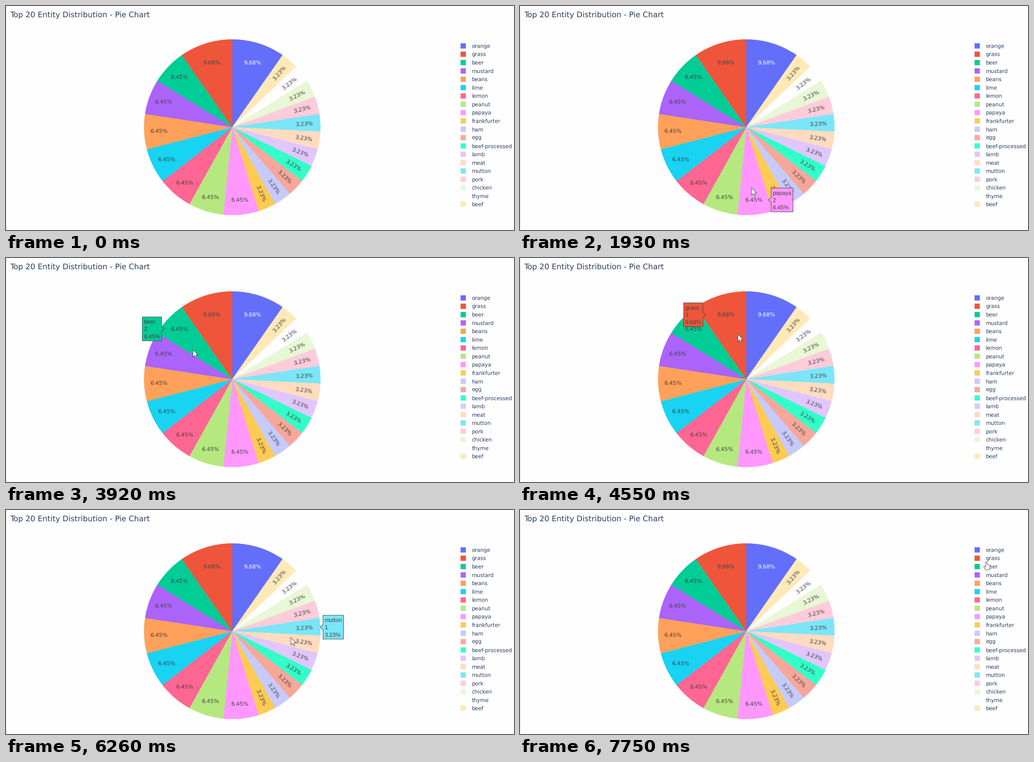
A matplotlib script that plays this animation: 1125x498 px, repeating every 8 s.

```python
import colorsys

import numpy as np
import matplotlib.pyplot as plt
from matplotlib.animation import FuncAnimation
from matplotlib.colors import to_rgb
from matplotlib.patches import Polygon, Rectangle, Wedge

W, H, DPI = 1125, 498, 100
LOOP, STEP = 8000, 25
PT = 72 / DPI
CX, CY, R = 501, 269.5, 195.2
INK, GREY = "#2a3f5f", "#444444"
HOVER_LAG = 70

NAMES = ("orange grass beer mustard beans lime lemon peanut papaya frankfurter "
         "ham egg beef-processed lamb meat mutton pork chicken thyme beef").split()
COUNTS = [3] * 2 + [2] * 7 + [1] * 11
TOTAL = sum(COUNTS)
BASE = ["#636efa", "#ef553b", "#00cc96", "#ab63fa", "#ffa15a",
        "#19d3f3", "#ff6692", "#b6e880", "#ff97ff", "#fecb52"]

# Cursor glides: begin, end, control point, stop
ENTRY = (995, 490)
GLIDES = [
    (150, 340, (882, 428), (769, 366)),
    (570, 1360, (651, 241), (615, 366)),
    (1380, 1440, (603, 379), (592, 392)),
    (1750, 2540, (450, 426), (407, 366)),
    (2560, 3350, (380, 296), (383, 275)),
    (3370, 4170, (385, 225), (430, 189)),
    (4190, 4990, (464, 167), (533, 163)),
    (5090, 5890, (590, 170), (625, 239)),
    (5910, 6500, (632, 235), (631, 327)),
    (6890, 7700, (760, 240), (1033, 115)),
]

ARROW = np.array([(0, 0), (0, 16.5), (3.8, 13), (6.4, 18.5), (8.7, 17.5),
                  (6.4, 12), (11.4, 12)])
HAND = np.array([(-1.5, 0.5), (1.5, 0.5), (1.5, 6), (8, 8), (8, 13), (6.3, 18),
                 (-2, 18), (-6, 11), (-5, 9.5), (-1.5, 12)])


def lighten(color, amount=0.2):
    h, l, s = colorsys.rgb_to_hls(*to_rgb(color))
    return colorsys.hls_to_rgb(h, min(1, l + amount), s)


def contrast(color):
    return "white" if np.dot(to_rgb(color), (0.299, 0.587, 0.114)) < 128 / 255 else GREY


def cursor_at(t):
    pos = np.array(ENTRY, float)
    for begin, end, control, stop in GLIDES:
        if t <= begin:
            break
        u = 1 - (1 - min(1, (t - begin) / (end - begin))) ** 1.5
        pos = ((1 - u) ** 2 * pos + 2 * u * (1 - u) * np.array(control)
               + u * u * np.array(stop))
    return pos


COLORS = BASE + [lighten(c) for c in BASE]

# Clockwise from the top: the first slice, then the rest in reverse
ORDER = [0] + list(range(len(NAMES) - 1, 0, -1))
EDGES = 360 / TOTAL * np.cumsum([0] + [COUNTS[i] for i in ORDER])


def slice_at(x, y):
    dx, dy = x - CX, y - CY
    if np.hypot(dx, dy) > R:
        return None
    angle = np.degrees(np.arctan2(dx, -dy)) % 360
    return NAMES[ORDER[np.searchsorted(EDGES, angle, side="right") - 1]]


plt.rcParams["text.hinting"] = "none"
fig = plt.figure(figsize=(W / DPI, H / DPI), dpi=DPI, facecolor="#fefefe")
ax = fig.add_axes([0, 0, 1, 1])
ax.set(xlim=(0, W), ylim=(H, 0))
ax.axis("off")


def write(x, y, text, px, color, font="DejaVu Sans", **kw):
    return ax.text(x, y, text, fontsize=px * PT, color=color, family=font,
                   va="baseline", **kw)


def slice_text(x, y, text, color, angle=0, px=12.3):
    drop = 0.365 * px
    a = np.radians(angle)
    write(x + drop * np.sin(a), y + 0.5 + drop * np.cos(a), text, px, color,
          ha="center", rotation=angle, rotation_mode="anchor")


def hover_label(x, y, side, name, count, share, color):
    """Box with a pointer whose tip is at (x, y); side is +1 or -1."""
    ink = contrast(color)
    lines = [write(x, y + 4.5 + dy, s, 12.7, ink, "Liberation Sans", zorder=6)
             for dy, s in zip((-16.5, 0, 16.5), (name, str(count), share))]
    w = max(t.get_window_extent().width for t in lines) + 6.5
    left = x + 6 if side > 0 else x - 6 - w
    for t in lines:
        t.set_x(left + 3.2)
    shape = np.array([(0, 0), (6, -6), (6, -26.5), (6 + w, -26.5),
                      (6 + w, 26.5), (6, 26.5), (6, 6)]) * (side, 1) + (x, y)
    box = ax.add_patch(Polygon(shape, fc=color, ec=ink, lw=PT, zorder=5))
    parts = [box] + lines
    for p in parts:
        p.set_visible(False)
    return parts


def draw_pie():
    labels = {}
    for i, a0, a1 in zip(ORDER, EDGES, EDGES[1:]):
        name, n, color = NAMES[i], COUNTS[i], COLORS[i]
        # A hairline edge closes the seams between slices
        ax.add_patch(Wedge((CX, CY), R, a0 - 90, a1 - 90, fc=color, ec=color,
                           lw=0.4 * PT))

        mid = (a0 + a1) / 2
        dx, dy = np.sin(np.radians(mid)), -np.cos(np.radians(mid))
        half = np.sin(np.pi * n / TOTAL)
        inner = half / (1 + half)
        reach = R * (1 - inner)
        x, y = CX + reach * dx, CY + reach * dy
        share = f"{100 * n / TOTAL:.2f}%"
        if n > 1:
            slice_text(x, y, share, contrast(color))
        else:
            slice_text(CX + 159.6 * dx, CY + 159.6 * dy, share, GREY, 90 - mid)

        side = 1 if dx > 0 else -1
        labels[name] = hover_label(x + side * inner * R, y, side, name, n,
                                   share, color)
    return labels


def draw_legend():
    for i, (name, color) in enumerate(zip(NAMES, COLORS)):
        y = 88.7 + 18.53 * i
        ax.add_patch(Rectangle((1006.7, y - 5.8), 11.7, 11.7, fc=color, lw=0,
                               snap=False))
        write(1031.5, y + 4.4, name, 11.8, INK)


ax.add_patch(Rectangle((0, 0), 1, H, fc="#dcdcdc", lw=0))
write(9.5, 25.5, "Top 20 Entity Distribution - Pie Chart", 17.05, INK)
labels = draw_pie()
draw_legend()

pointer = dict(fc="white", ec="#222222", lw=0.8 * PT, zorder=9)
arrow = ax.add_patch(Polygon(ARROW, **pointer))
hand = ax.add_patch(Polygon(HAND, **pointer))
dynamic = [arrow, hand] + [p for parts in labels.values() for p in parts]


def update(i):
    t = i * STEP
    pos = cursor_at(t)
    on_legend = t > GLIDES[-1][0] and pos[0] > 1004
    arrow.set_xy(ARROW + pos)
    hand.set_xy(HAND + pos)
    arrow.set_visible(t >= GLIDES[0][0] and not on_legend)
    hand.set_visible(on_legend)

    current = slice_at(*cursor_at(t - HOVER_LAG))
    for name, parts in labels.items():
        for p in parts:
            p.set_visible(name == current)
    return dynamic


anim = FuncAnimation(fig, update, frames=LOOP // STEP, interval=STEP,
                     repeat=True, repeat_delay=0, blit=False)
plt.show()
```
